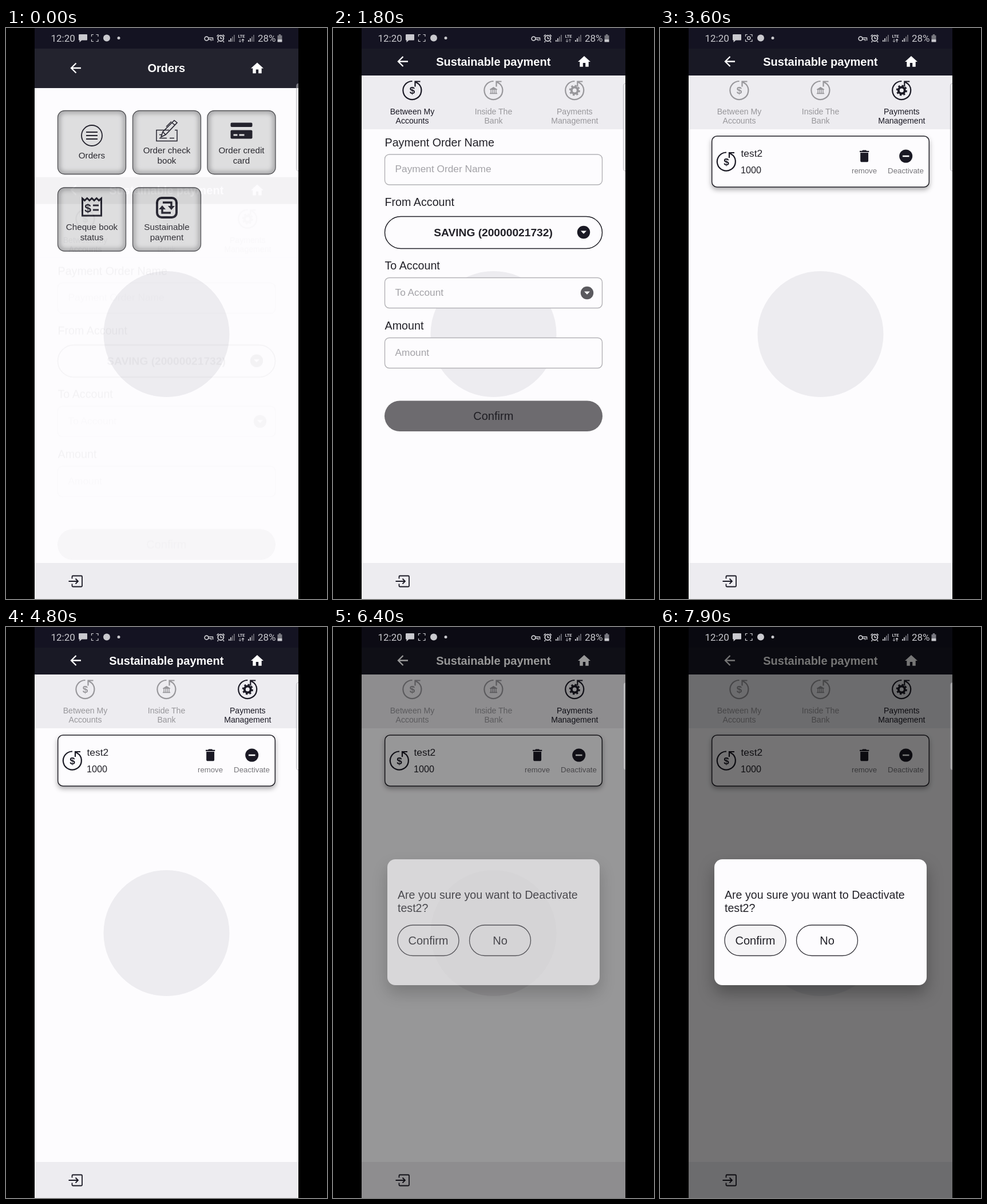
Recreate the animation shown at these times as an HTML page. Size 561 by 998 pixels, loop 8000 ms.

```html
<!DOCTYPE html>
<html lang="en">
<head>
<meta charset="utf-8">
<title>Sustainable payment</title>
<style>
  html, body { margin: 0; width: 100%; height: 100%; overflow: hidden; background: #000; }
  svg { display: block; width: 100%; height: 100%; font-family: "Liberation Sans", Arial, sans-serif; }
  .status { font-family: Roboto, sans-serif; }
  .card { filter: drop-shadow(0 4px 4px rgba(0, 0, 0, .32)); }
  .box { filter: drop-shadow(0 14px 14px rgba(0, 0, 0, .3)); }
</style>
</head>
<body>
<svg id="stage" viewBox="0 0 561 998" xmlns="http://www.w3.org/2000/svg"></svg>
<script>
const INK = '#1a1924', TEXT = '#222128', MUTED = '#98979b', HINT = '#a3a2a7',
      PAPER = '#fdfcfe', STRIP = '#edecf0', BAR = '#191925';

// Drawing helpers
const text = (x, y, size, str, fill = TEXT, extra = '') =>
  `<text x="${x}" y="${y}" font-size="${size}" fill="${fill}" ${extra}>${str}</text>`;
const mid = (x, y, size, str, fill = TEXT, extra = '') =>
  text(x, y, size, str, fill, 'text-anchor="middle" ' + extra);
const rect = (x, y, w, h, r, fill, extra = '') =>
  `<rect x="${x}" y="${y}" width="${w}" height="${h}" rx="${r}" fill="${fill}" ${extra}/>`;
const circle = (x, y, r, fill, extra = '') =>
  `<circle cx="${x}" cy="${y}" r="${r}" fill="${fill}" ${extra}/>`;
const line = (d, color, width, extra = '') =>
  `<path d="${d}" fill="none" stroke="${color}" stroke-width="${width}" ${extra}/>`;
const fill = (d, color, extra = '') => `<path d="${d}" fill="${color}" ${extra}/>`;
const at = (x, y, body) => `<g transform="translate(${x} ${y})">${body}</g>`;
const group = (id, body, extra = '') => `<g id="${id}" ${extra}>${body}</g>`;
const bold = 'font-weight="bold"';

// Shared parts
const header = (title, bottom, cy) =>
  rect(50, 36, 461, bottom - 36, 0, BAR) +
  at(0, cy, line('M131 0H114M122.5-8.5L114 0L122.5 8.5', '#fff', 2.3) +
    mid(280.3, 7, 20, title, '#fff', bold) +
    at(425.8, -12.8, fill('M10 20v-6h4v6h5v-8h3L12 3 2 12h3v8z', '#fff', 'transform="scale(1.1)"')));

const backdrop = () => rect(50, 36, 461, 962, 0, PAPER) + circle(280.5, 535, 110, STRIP);

const loop = inner =>
  line('M0-16A16 16 0 1 0 11.5-11L5-15.5M14-15.5H5V-6.5', 'currentColor', 2.2) + inner;
const dollar = mid(0, 6, 17, '$', 'currentColor', bold);
const bank = fill('M-6.5-2L0-6L6.5-2V-1H-6.5ZM-6.5 4.5h13v1.8h-13z', 'currentColor') +
  line('M-4.5-1V5M-1.5-1V5M1.5-1V5M4.5-1V5', 'currentColor', 1.4);
const gear = circle(0, 0, 5.5, 'none', 'stroke="currentColor" stroke-width="4"') +
  circle(0, 0, 8.2, 'none', 'stroke="currentColor" stroke-width="2.8" stroke-dasharray="3.22"');

const tab = (x, inner, a, b) =>
  `<g class="tab">${at(x, 109, loop(inner))}${mid(x, 150.5, 14.1, a, 'currentColor')}${mid(x, 167, 14.1, b, 'currentColor')}</g>`;

const drop = (x, y, color) => circle(x, y, 11.2, color) + fill(`M${x - 5} ${y - 2.5}h10l-5 5.2z`, '#fff');
const field = (y, label, hint, x = 108.5) =>
  text(90.5, y - 14.3, 19.7, label) +
  rect(90.5, y, 380, 53, 8, PAPER, 'stroke="#b3b2b6" stroke-width="1.4"') +
  text(x, y + 31, 17.3, hint, HINT);
const confirm = y => rect(90, y, 381, 53.5, 26.7, '#6d6b6f') + mid(280.3, y + 33.4, 20, 'Confirm', '#1e1d23');

const nameAndSource = field(221, 'Payment Order Name', 'Payment Order Name') +
  text(90.5, 311, 19.7, 'From Account') +
  rect(90.5, 329.5, 380, 56, 28, PAPER, `stroke="${TEXT}" stroke-width="1.5"`) +
  mid(280, 364, 19.2, 'SAVING (20000021732)', TEXT, bold) + drop(438, 357, INK);

const star = Array.from({ length: 10 }, (_, i) => {
  const r = i % 2 ? 4.6 : 11.5, a = i * Math.PI / 5;
  return `${(r * Math.sin(a)).toFixed(1)},${(-r * Math.cos(a)).toFixed(1)}`;
}).join(' ');

// Orders menu
const tile = (x, y, icon, a, b) => at(x, y,
  `<g clip-path="url(#tile)">${rect(0, 0, 119, 111, 12, '#dcdcdd')}` +
  rect(0, 0, 119, 111, 12, 'none', 'stroke="#8f8f92" stroke-width="7" filter="url(#soft)"') + '</g>' +
  rect(0, 0, 119, 111, 12, 'none', 'stroke="#47474b" stroke-width="1.3"') +
  at(59.5, 0, icon) +
  (b ? mid(59.5, 74, 15.2, a) + mid(59.5, 92, 15.2, b) : mid(59.5, 83, 15.2, a)));

const listIcon = circle(0, 43.5, 18, 'none', `stroke="${INK}" stroke-width="1.8"`) +
  line('M-10 37.5H10M-10 43.5H10M-10 49.5H10', INK, 1.8);
const chequeIcon = line('M4 34H-18V53H18V34H14M-13 48H0M5 48H13M-13 42H-8', INK, 1.5) +
  line('M-10 46L-7 37L13 17L18 21L-2 42ZM-7 37L-2 42M9 21L14 25', INK, 1.6) +
  line('M8 19L-1 28', INK, 1.4);
const cardIcon = rect(-19, 21, 38, 7.5, 2, INK) + rect(-19, 34, 38, 15, 2, INK) +
  line('M-14 42.5h7M-4 42.5h9', '#dcdcdd', 3);
const receiptIcon = line('M-16.5 19V49H16.5V19L12.5 22.5L8.3 18.5L4.1 22.5L0 18.5L-4.1 22.5L-8.3 18.5L-12.5 22.5Z', INK, 3) +
  mid(-7, 43, 21, '$', INK, bold) + line('M2 31H12M2 39H12', INK, 3);
const cycleIcon = rect(-17, 18, 34, 34, 8, 'none', `stroke="${INK}" stroke-width="4"`) +
  line('M-7 26H8V34M7 44H-8V36', INK, 3.4) +
  fill('M2 32H14L8 39ZM-2 38H-14L-8 31Z', INK);

const orders = header('Orders', 105, 70) +
  tile(90.5, 144.5, listIcon, 'Orders') +
  tile(221.5, 144.5, chequeIcon, 'Order check', 'book') +
  tile(352, 144.5, cardIcon, 'Order credit', 'card') +
  tile(90.5, 279, receiptIcon, 'Cheque book', 'status') +
  tile(221.5, 279, cycleIcon, 'Sustainable', 'payment');

// Payment pages
const between = nameAndSource + field(436.5, 'To Account', 'To Account') + drop(444, 463, '#5a595e') +
  field(541.5, 'Amount', 'Amount') + confirm(651.5);

const inside = nameAndSource + field(436.5, 'To Account', 'Enter To Account', 144.5) +
  at(117, 463.5, `<polygon points="${star}" fill="#5a595e"/>`) +
  field(541.5, 'Pick Account Type', 'Account Type') + drop(444, 568, '#5a595e') +
  field(646, 'Amount', 'Amount') + confirm(756);

const manage = rect(90.7, 189, 379.6, 89, 9, PAPER, `class="card" stroke="${TEXT}" stroke-width="1.5"`) +
  `<g color="${INK}">${at(116, 233.5, loop(dollar))}</g>` +
  text(141.5, 224.5, 17.4, 'test2') + text(141, 253.5, 16.2, '1000') +
  at(343.2, 210, fill('M6 19c0 1.1.9 2 2 2h8c1.1 0 2-.9 2-2V7H6zM19 4h-3.5l-1-1h-5l-1 1H5v2h14z', INK, 'transform="scale(1.16)"')) +
  circle(429.7, 224, 11.5, INK) + line('M424 224h11.5', '#fff', 2.6) +
  mid(357, 254, 13.2, 'remove', '#77767b') + mid(429.5, 254, 13.3, 'Deactivate', '#77767b');

const payment = header('Sustainable payment', 83, 58.5) + rect(50, 83, 461, 94, 0, STRIP) +
  tab(138.5, dollar, 'Between My', 'Accounts') +
  tab(280.5, bank, 'Inside The', 'Bank') +
  tab(422.3, gear, 'Payments', 'Management') +
  group('between', between) + group('inside', inside) + group('manage', manage);

const footer = rect(50, 935, 461, 63, 0, STRIP) +
  line('M115.5 962.5V959Q115.5 957.5 117 957.5H131.5Q133 957.5 133 959V975Q133 976.5 131.5 976.5H117Q115.5 976.5 115.5 975V971.5M109.5 967H126M121.5 962.5L126 967L121.5 971.5', INK, 1.8);

const pill = (x, id, label) =>
  rect(x, 521, 107, 53.5, 26.7, PAPER, `id="${id}" stroke="#34333a" stroke-width="1.3"`) +
  mid(x + 53.5, 554.5, 20, label);
const dialog = rect(95, 406, 371, 220, 14, PAPER, 'class="box"') +
  text(113, 475.2, 19.6, 'Are you sure you want to Deactivate') + text(113, 497.5, 19.6, 'test2?') +
  pill(113, 'yes', 'Confirm') + pill(238.5, 'no', 'No');

// Phone status bar
const LIGHT = '#c9c9ce';
const signal = x => fill(`M${x} 24v-3h1.8v3zM${x + 3} 24v-6h1.8v6z`, LIGHT) +
  fill(`M${x + 6} 24v-9h1.8v9zM${x + 9} 24v-12h1.8v12z`, '#6b6b74');
const status = text(78.5, 24, 17, '12:20', LIGHT) +
  fill('M128.5 11h12.5q1 0 1 1v8.500q0 1-1 1h-8.500l-4 3.500v-3.500h-.5q-1 0-1-1V12q0-1 1.500-1z', LIGHT) +
  line('M149.500 15V11.500H153M157.500 11.500H161V15M161 20V23.500H157.500M153 23.500H149.500V20', LIGHT, 1.2) +
  group('scan', circle(155.3, 17.5, 2.6, 'none', `stroke="${LIGHT}" stroke-width="1.5"`)) +
  circle(176, 17.5, 6, LIGHT) + circle(197, 17.5, 2.5, LIGHT) +
  circle(350.5, 18.500, 3.4, 'none', `stroke="${LIGHT}" stroke-width="1.7"`) +
  line('M354 17.200H362M354 20H358.500V22.500M361.500 17V22', LIGHT, 1.6) +
  circle(375.3, 18, 5, 'none', `stroke="${LIGHT}" stroke-width="2"`) +
  line('M375.300 15V18.500H378M368.500 14.500L371.500 11.500M382 14.500L379 11.500M371 23L369.500 25M379.500 23L381 25', LIGHT, 1.6) +
  signal(389) + mid(411.5, 17, 7.5, 'LTE', LIGHT, bold) +
  line('M409 19V24.500M407 22.500L409 24.500L411 22.500', '#8b8b93', 1.2) +
  group('up', line('M414 25V19.500M412 21.500L414 19.500L416 21.500', LIGHT, 1.2)) +
  signal(423) + text(440, 24, 17, '28%', LIGHT) +
  fill('M474.500 13h2.200v-2h3.600v2h2.200v7h-8z', '#77777f') + rect(474.5, 20, 8, 4.500, .5, LIGHT);

const stage = document.getElementById('stage');
stage.innerHTML = `<defs>
    <clipPath id="screen"><rect x="50" width="461" height="998"/></clipPath>
    <clipPath id="tile"><rect width="119" height="111" rx="12"/></clipPath>
    <filter id="soft"><feGaussianBlur stdDeviation="4"/></filter>
  </defs>
  <rect width="561" height="998"/>
  <g clip-path="url(#screen)">` +
  backdrop() + group('orders', orders) + group('cover', backdrop()) + group('payment', payment) + footer +
  rect(50, 0, 461, 36, 0, '#141322') +
  rect(50, 0, 461, 998, 0, '#000', 'id="shade"') + group('dialog', dialog) +
  group('status', status, 'class="status"') +
  rect(507.5, 97, 12, 153, 4, '#fff', 'fill-opacity=".38" stroke="#85848c" stroke-opacity=".55"') + '</g>';

const el = id => document.getElementById(id);
const tabs = [...stage.querySelectorAll('.tab')];
const fade = (id, v) => {
  el(id).setAttribute('opacity', v);
  el(id).setAttribute('visibility', v > 0 ? 'visible' : 'hidden');
};
const ramp = (t, start, length) => Math.min(1, Math.max(0, (t - start) / length));
const out = (x, power) => 1 - (1 - x) ** power;

const LOOP = 8000, TO_INSIDE = 2200, TO_MANAGE = 3300, ASK = 6305;

function draw(t) {
  // The payment page rises over the menu
  const rise = out(ramp(t, 0, 200), 3), shown = .03 + .97 * rise;
  fade('orders', rise < 1 ? 1 : 0);
  fade('cover', shown);
  fade('payment', shown);
  el('payment').setAttribute('transform', `translate(0 ${228 * (1 - rise)})`);

  const active = t < TO_INSIDE ? 0 : t < TO_MANAGE ? 1 : 2;
  tabs.forEach((g, i) => g.setAttribute('color', i === active ? INK : MUTED));
  const second = ramp(t, TO_INSIDE - 50, 100), third = ramp(t, TO_MANAGE - 50, 100);
  fade('between', 1 - second);
  fade('inside', second * (1 - third));
  fade('manage', third);

  fade('shade', .54 * out(ramp(t, ASK, 400), 5));
  fade('dialog', ramp(t, ASK, 150));
  el('yes').setAttribute('fill', t > ASK + 150 ? '#f5f4f6' : PAPER);

  const beat = t % 1000;
  fade('scan', (beat >= 100 && beat < 400) || (beat >= 600 && beat < 800) ? 1 : 0);
  fade('up', t >= 1600 && t < 2100 ? .55 : 1);
}

const begin = performance.now();
function tick() {
  draw((performance.now() - begin) % LOOP);
  requestAnimationFrame(tick);
}
tick();
</script>
</body>
</html>
```
